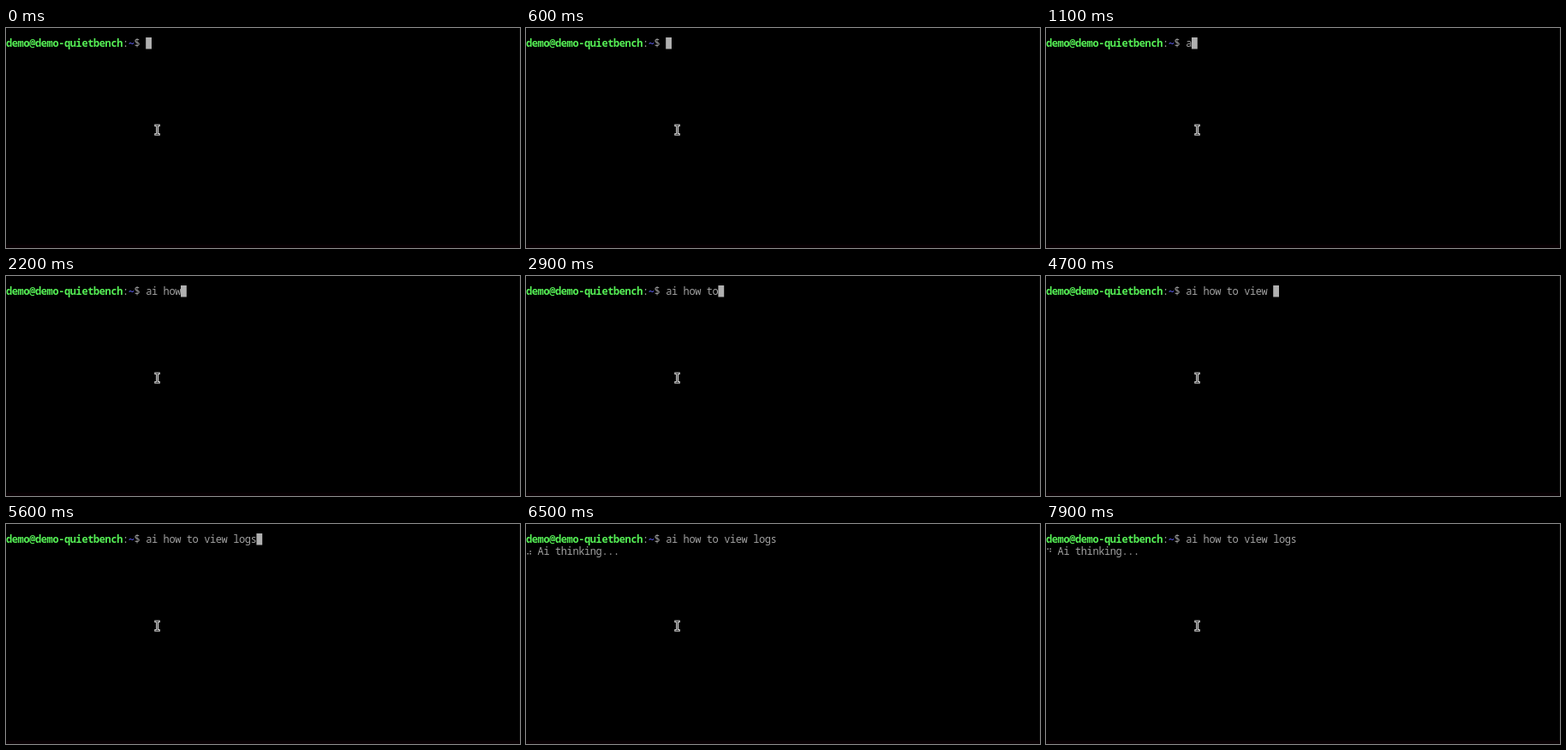
These frames come from a looping animation (600 by 257 pixels, 8000 ms). An HTML page with a canvas:

```html
<!DOCTYPE html>
<html lang="en">
<head>
<meta charset="utf-8">
<title>Terminal</title>
<style>
html, body { margin: 0; width: 100%; height: 100%; overflow: hidden; background: #000; }
canvas { display: block; }
</style>
</head>
<body>
<canvas id="stage" width="600" height="257"></canvas>
<script>
const ctx = document.getElementById('stage').getContext('2d');
const LOOP = 8000, CELL = 6.8, GREY = '#a0a0a0';
const HOST = 'demo@demo-quietbench', COMMAND = 'ai how to view logs';
const PROMPT_COLS = HOST.length + 4;
const KEY_TIMES = [800, 1200, 1400, 1600, 1800, 2100, 2300, 2500, 2700, 3000,
  3300, 3600, 3900, 4200, 4500, 4800, 5100, 5400, 5600];
const ENTER = 5800, THINK = 5900, SPIN_STEP = 87.5;
const SPINNER = '⠋⠙⠹⠸⠼⠴⠦⠧⠇⠏';

function rect(color, x, y, w, h) {
  ctx.fillStyle = color;
  ctx.fillRect(x, y, w, h);
}

function write(text, col, row, color = GREY, weight = 400) {
  ctx.font = `${weight} 12px "Noto Sans Mono", "DejaVu Sans Mono", monospace`;
  ctx.letterSpacing = '-0.4px';
  ctx.fillStyle = color;
  ctx.fillText(text, col * CELL, 22 + row * 14.4);
}

function block(col, row) {
  rect('#b0b0b0', col * CELL, 11 + row * 14.4, CELL, 13.5);
}

function beam(x, y) {
  rect('#d8d8d8', x - 3, y - 6.5, 6.5, 2.6);
  rect('#d8d8d8', x - 3, y + 4, 6.5, 2.6);
  rect('#d8d8d8', x - 1.2, y - 6, 3, 12);
  rect('#222', x - 2, y - 5.6, 4.5, 0.8);
  rect('#222', x - 2, y + 4.9, 4.5, 0.8);
  rect('#222', x - 0.1, y - 5, 0.8, 10);
}

// Bits 0-2 are the left column of a braille cell, bits 3-5 the right one.
function spinner(t) {
  const step = Math.floor((t - THINK + 20) / SPIN_STEP) + 8;
  const bits = SPINNER.charCodeAt(step % SPINNER.length) - 0x2800;
  for (let i = 0; i < 6; i++) {
    if (bits >> i & 1) rect(GREY, i < 3 ? 1.4 : 4.4, 28.4 + i % 3 * 2.8, 1.5, 1.5);
  }
}

function draw(t) {
  rect('#000', 0, 0, 600, 257);
  rect('#080003', 0, 253, 600, 4);
  rect('#0b0b0b', 599, 0, 1, 253);

  const typed = KEY_TIMES.filter(k => k <= t).length;
  write(HOST, 0, 0, '#55f055', 700);
  write(':', HOST.length, 0);
  write('~', HOST.length + 1, 0, '#5c5ce8', 700);
  write('$', HOST.length + 2, 0);
  write(COMMAND.slice(0, typed), PROMPT_COLS, 0);

  if (t < ENTER) block(PROMPT_COLS + typed, 0);
  else if (t < THINK) block(0, 1);
  else {
    spinner(t);
    write('Ai thinking...', 2, 1);
  }
  beam(176.3, 119);
}

const start = performance.now();
function tick() {
  const t = (performance.now() - start) % LOOP;
  draw(Math.floor(t / 100) * 100);
  requestAnimationFrame(tick);
}
tick();
</script>
</body>
</html>
```
